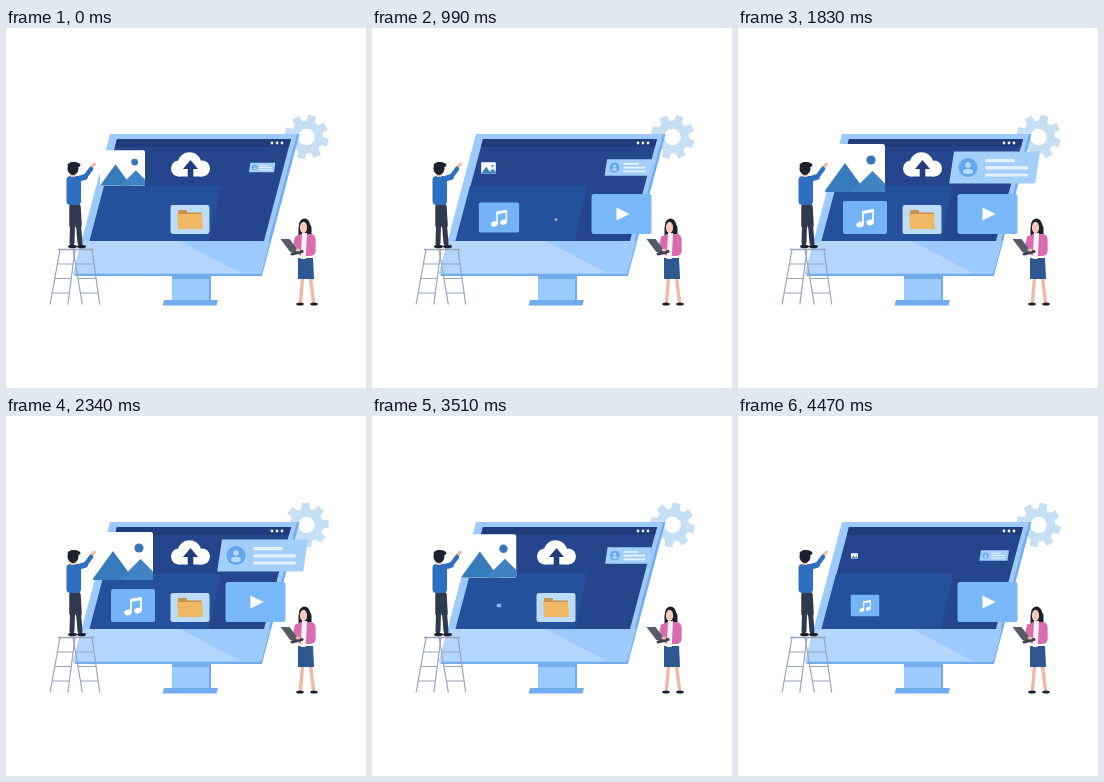
These frames come from a looping animation (360 by 360 pixels, 4.5 s). An HTML page with a canvas:

```html
<!DOCTYPE html>
<html>
<head>
<meta charset="utf-8">
<style>
html, body { margin: 0; width: 100%; height: 100%; overflow: hidden; background: #fff; }
canvas { display: block; width: 100vmin; height: 100vmin; }
</style>
</head>
<body>
<canvas id="stage" width="360" height="360"></canvas>
<script>
const ctx = document.getElementById('stage').getContext('2d');
const LOOP = 4500, CYCLE = 3600, GEAR_TURN = 7200;
const FIRST = 50, STAGGER = 185, GROW = 790, SHRINK_AT = 2795, SHRINK = 600;
const LEAN = 0.265;
const NAVY = '#213c7d', EDGE = '#73acee', PALE = '#b4d6fc', SKIN = '#f0b9a4';

function box(color, x, y, w, h, r = 0) {
  ctx.fillStyle = color;
  ctx.beginPath();
  ctx.roundRect(x, y, w, h, r);
  ctx.fill();
}

function oval(color, x, y, rx, ry = rx, turn = 0) {
  ctx.fillStyle = color;
  ctx.beginPath();
  ctx.ellipse(x, y, rx, ry, turn, 0, Math.PI * 2);
  ctx.fill();
}

function line(color, width, x1, y1, x2, y2) {
  ctx.strokeStyle = color;
  ctx.lineWidth = width;
  ctx.beginPath();
  ctx.moveTo(x1, y1);
  ctx.lineTo(x2, y2);
  ctx.stroke();
}

// A band with level top and bottom; its ends lean by `left` and `right` per pixel of height.
function band(color, x, y, w, h, left = LEAN, right = left) {
  ctx.fillStyle = color;
  ctx.beginPath();
  ctx.moveTo(x, y);
  ctx.lineTo(x + w, y);
  ctx.lineTo(x + w - h * right, y + h);
  ctx.lineTo(x - h * left, y + h);
  ctx.fill();
}

function limb(color, width, x1, y1, x2, y2) {
  ctx.lineCap = 'round';
  line(color, width, x1, y1, x2, y2);
  ctx.lineCap = 'butt';
}

function at(x, y, draw, scale = 1) {
  ctx.save();
  ctx.translate(x, y);
  ctx.scale(scale, scale);
  draw();
  ctx.restore();
}

function gear(t) {
  const step = Math.PI / 4;
  const phase = t / GEAR_TURN * Math.PI * 2 - step * 5 / 3;
  at(300.5, 109, () => {
    ctx.fillStyle = '#c6dff3';
    ctx.beginPath();
    for (let i = 0; i < 32; i++) {
      const outer = i % 4 === 1 || i % 4 === 2;
      const side = i % 4 < 2 ? -1 : 1;
      const angle = phase + Math.floor(i / 4) * step + side * step * (outer ? 0.22 : 0.34);
      const r = outer ? 22.5 : 16.5;
      ctx.lineTo(Math.cos(angle) * r, Math.sin(angle) * r);
    }
    ctx.closePath();
    ctx.arc(0, 0, 8.3, 0, Math.PI * 2, true);
    ctx.fill();
  });
}

function stand() {
  box('#9ccafc', 166, 247, 38, 26);
  box(EDGE, 166, 247, 38, 4);
  box(EDGE, 203, 247, 2, 26);
  band(EDGE, 158, 272, 54, 5.5);
}

function monitor() {
  band(EDGE, 106, 106, 187.5, 142);
  band('#9ccafc', 104, 106, 187, 140);
  band('#9ccafc', 76, 213, 188, 32);
  band(PALE, 76, 213, 98, 32, LEAN, -1.9);
  band('#25458c', 111, 111, 174, 102);
  band('#25509c', 98, 158, 117, 55, LEAN, 0.22);
  band(NAVY, 111, 111, 174, 8);
  for (let i = 0; i < 3; i++) oval('#e9f4ff', 266 + i * 5, 115, 1.4);
}

function ladder() {
  const color = '#97a5bd', top = 221.5, height = 55;
  line(color, 1.5, 52, top, 88, top);
  const rails = [[54, -0.18], [69, -0.13], [67, 0.17], [86, 0.14]];
  const railX = ([x, lean], drop) => x + lean * drop;
  for (const rail of rails) line(color, 1.2, rail[0], top, railX(rail, height), top + height);
  for (let i = 1; i <= 3; i++) {
    const drop = i * 14.5;
    for (const pair of [rails.slice(0, 2), rails.slice(2)]) {
      line(color, 1, railX(pair[0], drop), top + drop, railX(pair[1], drop), top + drop);
    }
  }
}

function man() {
  const cloth = '#303a4e', shirt = '#2d6fc0', dark = '#1d212d';
  for (const side of [-1, 1]) {
    limb(cloth, 6.5, 69 + side * 2.5, 179, 69.5 + side * 3, 197);
    limb(cloth, 5, 69.5 + side * 3, 197, 70 + side * 4, 215);
    oval(dark, 71 + side * 4.5, 218.5, 4.5, 1.8);
  }
  limb(SKIN, 3, 84, 141, 88.5, 136);
  box(shirt, 60.5, 148, 14.5, 29, 4);
  limb(shirt, 5.5, 72, 151, 79, 149);
  limb(shirt, 4.5, 79, 149, 85, 141);
  box(SKIN, 64.5, 143, 5, 6);
  oval(dark, 67, 140.5, 5.5, 6.5);
  oval(dark, 68, 137, 6.5, 3);
}

function woman() {
  const hair = '#1d1f2b', jacket = '#d86cae';
  for (const side of [-1, 1]) {
    limb(SKIN, 3.4, 300.5 + side * 4, 250, 301 + side * 6.5, 274);
    oval(hair, 301 + side * 7, 276, 3.8, 1.5);
  }
  box(hair, 292.5, 195, 13, 18, 5);
  oval(hair, 298.5, 197, 5.5, 6.5);
  oval('#f5cbbb', 297.5, 199.5, 3.6, 5.8);
  band('#2f5890', 292, 230, 15, 21, 0, -0.05);
  box(jacket, 291, 206, 18.5, 22, 5);
  limb(jacket, 4.5, 307, 211, 307, 224);
  limb(jacket, 4.5, 291, 210, 289, 219);
  band('#fff2f3', 296, 205, 5, 26, 0.05);
  band('#555a69', 274.5, 211, 9, 13, -0.75);
  limb('#3b404f', 3, 286, 226, 296, 223.5);
  oval(SKIN, 292, 222, 2.4, 1.5);
}

function triangle(color, halfWidth, top, base) {
  ctx.fillStyle = color;
  ctx.beginPath();
  ctx.moveTo(0, top);
  ctx.lineTo(halfWidth, base);
  ctx.lineTo(-halfWidth, base);
  ctx.fill();
}

function video() {
  box('#78b7f8', -30, -20, 60, 40, 2.5);
  ctx.rotate(Math.PI / 2);
  triangle('#fff', 6.5, -8, 5);
}

function music() {
  box('#74b3f5', -22, -16.5, 44, 33, 2);
  for (const x of [-5, 5]) {
    oval('#fff', x, 6 - x / 5, 3.8, 2.8, -0.3);
    line('#fff', 1.7, x + 3, 6 - x / 5, x + 3, -7 - x / 5);
  }
  line('#fff', 3, -2.5, -5, 8.5, -7);
}

function contact() {
  band('#a3cffa', -40, -16, 86, 32, 0.15);
  oval('#65a7ed', -26, 0, 9.5);
  oval('#b8dbff', -26, -2.5, 2.8);
  oval('#b8dbff', -26, 4, 5, 2.8);
  for (let i = 0; i < 3; i++) box('#e6f4ff', -9, i * 7.2 - 8.5, i ? 43 : 30, 3.2, 1.6);
}

function picture() {
  box('#fff', -30.5, -24, 61, 48, 2.5);
  ctx.clip();
  at(-9.5, 0, () => triangle('#367bbb', 21, -5, 24));
  at(18, 0, () => triangle('#3e83c2', 21, 3, 24));
  oval('#3975b6', 16.5, -8, 4.6);
}

function folder() {
  box('#bcdcfa', -19.5, -14.5, 39, 29, 2.5);
  box('#c9924f', -12, -9.5, 9, 6, 1);
  box('#c9924f', -12, -7, 24, 14, 1);
  band('#f0b765', -13, -5.5, 25, 15, -0.07);
}

function cloud() {
  oval('#fff', -1, -1, 11.8);
  for (const side of [-1, 1]) oval('#fff', side * 11.5, 3.5, 8);
  box('#fff', -12, 2, 24, 9.5);
  triangle(NAVY, 7.5, -5, 4);
  box(NAVY, -2.8, 3, 5.6, 9.5);
}

// Listed in the order in which they appear.
const tiles = [
  [249.5, 186, video],
  [127, 189.5, music],
  [256, 139.5, contact],
  [116.5, 140, picture],
  [184, 191.5, folder],
  [184.5, 137, cloud]
];

function tileScale(t, index) {
  const local = (t - FIRST - STAGGER * index + CYCLE) % CYCLE;
  if (local < GROW) return (local / GROW) ** 2;
  const p = Math.min(1, Math.max(0, (local - SHRINK_AT) / SHRINK));
  return 1 - p * p * (3 - 2 * p);
}

function render(t) {
  box('#fff', 0, 0, 360, 360);
  gear(t);
  stand();
  monitor();
  tiles.forEach(([x, y, draw], i) => {
    const scale = tileScale(t, i);
    if (scale > 0.003) at(x, y, draw, scale);
  });
  ladder();
  man();
  woman();
}

const start = performance.now();
function tick() {
  render((performance.now() - start) % LOOP);
  requestAnimationFrame(tick);
}
tick();
</script>
</body>
</html>
```
